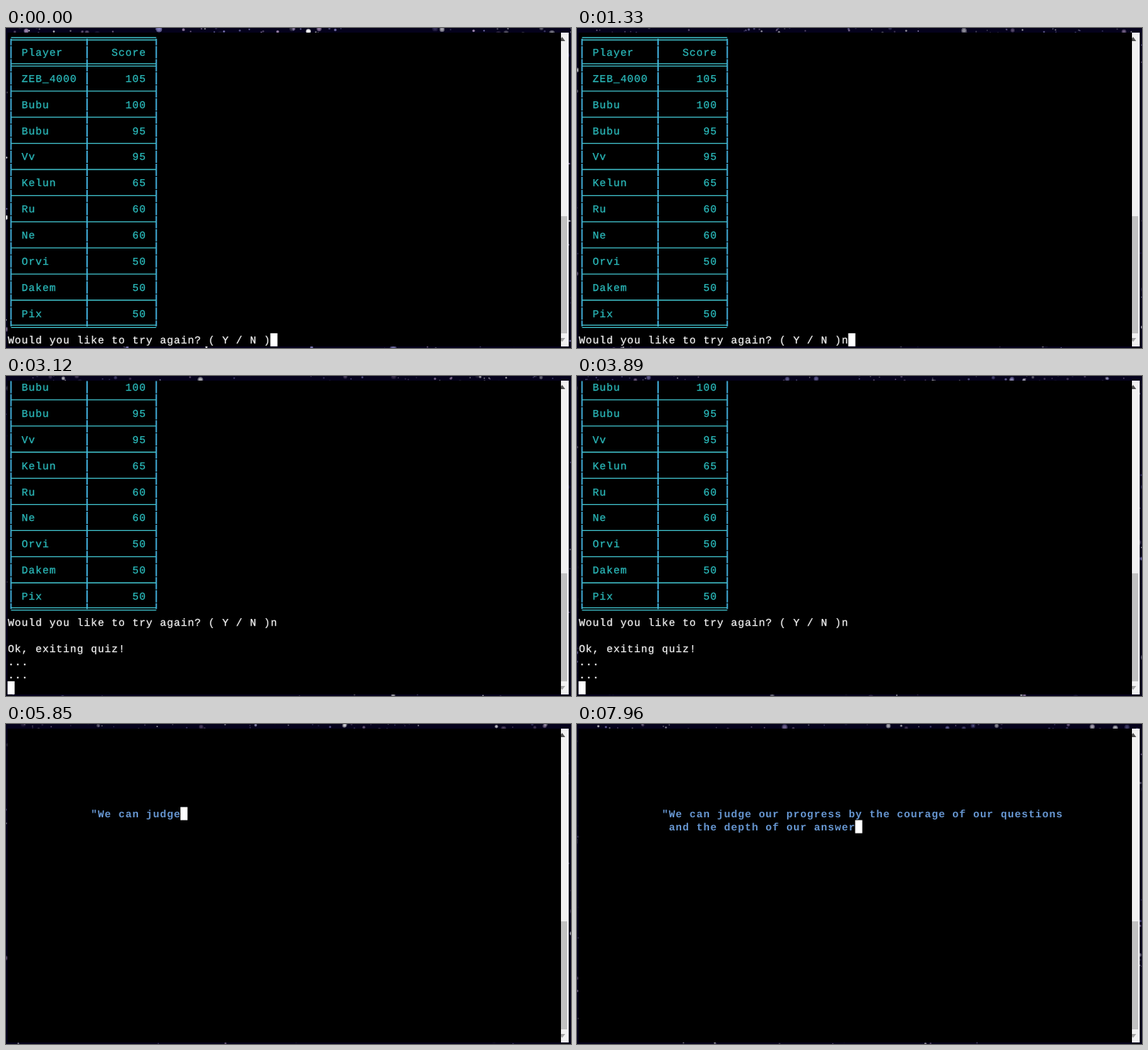
An HTML page with a canvas for the animation above (8 s loop, 732 by 415 pixels).

```html
<!DOCTYPE html>
<html lang="en">
<head>
<meta charset="utf-8">
<title>Quiz terminal</title>
<style>
  html, body { margin: 0; width: 732px; height: 415px; overflow: hidden; background: #05021c; }
  canvas, svg { position: absolute; left: 0; top: 0; display: block; }
  canvas { filter: blur(0.6px); }
  text {
    font: 13.5px "Liberation Mono", "Courier New", monospace;
    letter-spacing: 0.86px;
    white-space: pre;
    text-rendering: geometricPrecision;
    stroke-width: 0.25;
  }
  .table text { fill: #2bbabb; stroke: #2bbabb; }
  .rule { stroke: #3fbcc6; stroke-width: 1.3; }
  .bar { stroke: #43afdb; stroke-width: 1.8; }
  .prompt text { fill: #f2f2f2; stroke: #f2f2f2; }
  .quote text { fill: #6797d2; font-weight: bold; }
</style>
</head>
<body>
<canvas id="sky" width="732" height="415"></canvas>
<svg id="stage" width="732" height="415" viewBox="0 0 732 415">
  <defs><clipPath id="screen"><rect x="2" y="6" width="717" height="407"/></clipPath></defs>
  <rect x="712" y="6" width="17" height="407" fill="#f1f1f1"/>
  <path d="M720.5 11.5l4 5.5h-8z" fill="#505050"/>
  <path d="M720.5 407l4-5h-8z" fill="#a3a3a3"/>
  <rect id="thumb" x="714" width="13" fill="#c1c1c1"/>
  <rect x="2" y="6" width="717" height="407" fill="#000"/>
  <g clip-path="url(#screen)">
    <g id="log"><g id="table" class="table"></g><g id="prompt" class="prompt"></g></g>
    <g id="quote" class="quote"></g>
    <rect id="cursor" width="9.2" height="17" fill="#fff"/>
  </g>
</svg>
<script>
const LOOP = 8000, CELL = 8.96, ROW = 16.95, LEFT = 2, TOP = 6, LAST_ROW = 23;
const KEY_AT = 1120, ENTER_AT = 2075, REPLY_AT = 2100, CLEAR_AT = 4450, QUOTE_AT = 5446;
const CHAR_MS = 28, INDENT = 11, QUOTE_ROW = 6;

const ASK = 'Would you like to try again? ( Y / N )';
const REPLY = '\nOk, exiting quiz!\n...\n...\n';
const QUOTE = ' "We can judge our progress by the courage of our questions\n' +
              '  and the depth of our answers."';
const SCORES = [
  ['Player', 'Score'], ['ZEB_4000', 105], ['Bubu', 100], ['Bubu', 95], ['Vv', 95],
  ['Kelun', 65], ['Ru', 60], ['Ne', 60], ['Orvi', 50], ['Dakem', 50], ['Pix', 50]
];

const $ = id => document.getElementById(id);
const colX = col => LEFT + col * CELL;
const rowY = row => TOP + row * ROW;

function add(parent, tag, attrs, content) {
  const el = document.createElementNS('http://www.w3.org/2000/svg', tag);
  for (const name in attrs) el.setAttribute(name, attrs[name]);
  if (content !== undefined) el.textContent = content;
  parent.appendChild(el);
  return el;
}

const addText = (parent, col, row, content) =>
  add(parent, 'text', { x: colX(col) + 0.4, y: rowY(row) + 12.9 }, content);

function addLine(cls, x1, y1, x2, y2) {
  add($('table'), 'line', { class: cls, x1, y1, x2, y2 });
}

function buildTable() {
  const edges = [0, 11, 21].map(col => colX(col + 0.5));
  const end = SCORES.length * 2;
  for (let row = 0; row <= end; row++) {
    const y = rowY(row), mid = y + 8;
    const from = row === 0 ? mid : y + 0.5;
    const to = row === end ? mid : y + ROW - 0.5;
    for (const x of edges) addLine('bar', x, from, x, to);
    if (row % 2) {
      const [name, score] = SCORES[(row - 1) / 2];
      addText($('table'), 2, row, name);
      addText($('table'), 20 - String(score).length, row, score);
    } else {
      const double = row === 0 || row === 2 || row === end;
      for (const dy of double ? [-1.5, 1.5] : [0]) {
        addLine('rule', edges[0], mid + dy, edges[2], mid + dy);
      }
    }
  }
}

// Reuses a fixed pool of text rows
function makeWriter(group, firstRow, count) {
  const rows = Array.from({ length: count }, (_, i) => addText(group, 0, firstRow + i, ''));
  return lines => rows.forEach((el, i) => {
    const value = lines[i] || '';
    if (el.textContent !== value) el.textContent = value;
  });
}

const typed = (text, start, t) =>
  text.slice(0, Math.max(0, Math.floor((t - start) / CHAR_MS)));

function random(n) {
  const v = Math.sin(n * 127.1 + 11.7) * 43758.5453;
  return v - Math.floor(v);
}

const sky = $('sky').getContext('2d');

function drawSky(t) {
  sky.globalAlpha = 1;
  sky.fillStyle = '#05021c';
  sky.fillRect(0, 0, 732, 415);
  const glow = 0.6 + 0.4 * Math.max(0, 1 - t / 1200);
  for (let i = 0; i < 110; i++) {
    const age = t / (700 + 900 * random(i)) + random(i + 200);
    const seed = i + 37 * Math.floor(age);
    const part = age % 1;
    const along = random(seed + 400), out = 9 * part - 2;
    let x = along * 732 + (along - 0.5) * 14 * part;
    let y = 6 - out;
    if (i >= 65 && i < 85) y = 412 + out;
    if (i >= 85) {
      x = i < 97 ? 3 - out : 728 + out;
      y = along * 415;
    }
    const size = (0.6 + 2 * random(seed + 600) ** 4) * (0.6 + 0.5 * glow);
    sky.fillStyle = ['#ffffff', '#8c88c8', '#a890b8'][i % 3];
    sky.globalAlpha = glow * (0.25 + 0.6 * random(seed + 800)) * Math.sin(Math.PI * part);
    for (const spread of [1.6, 1]) {
      sky.beginPath();
      sky.arc(x, y, size * spread, 0, 7);
      sky.fill();
    }
  }
}

buildTable();
const writePrompt = makeWriter($('prompt'), LAST_ROW, 6);
const writeQuote = makeWriter($('quote'), QUOTE_ROW, 2);

function draw(t) {
  const answer = (t >= KEY_AT ? 'n' : '') + (t >= ENTER_AT ? '\n' : '');
  const log = (ASK + answer + typed(REPLY, REPLY_AT, t)).split('\n');
  const quote = typed(QUOTE, QUOTE_AT, t).split('\n').map(s => ' '.repeat(INDENT) + s);
  const cleared = t >= CLEAR_AT;
  const scroll = log.length - 1;
  const lines = cleared ? quote : log;
  const cursorRow = cleared ? QUOTE_ROW + quote.length - 1 : LAST_ROW;

  $('log').setAttribute('visibility', cleared ? 'hidden' : 'visible');
  $('log').setAttribute('transform', `translate(0 ${-scroll * ROW})`);
  writePrompt(log);
  writeQuote(cleared ? quote : []);
  $('cursor').setAttribute('x', colX(lines[lines.length - 1].length));
  $('cursor').setAttribute('y', rowY(cursorRow));

  // The thumb shrinks as the scrollback grows
  const thumb = 376 * 24 / (59.4 + scroll);
  $('thumb').setAttribute('y', 396 - thumb);
  $('thumb').setAttribute('height', thumb);
  drawSky(t);
}

const start = performance.now();
function tick() {
  draw((performance.now() - start) % LOOP);
  requestAnimationFrame(tick);
}
tick();
</script>
</body>
</html>
```
